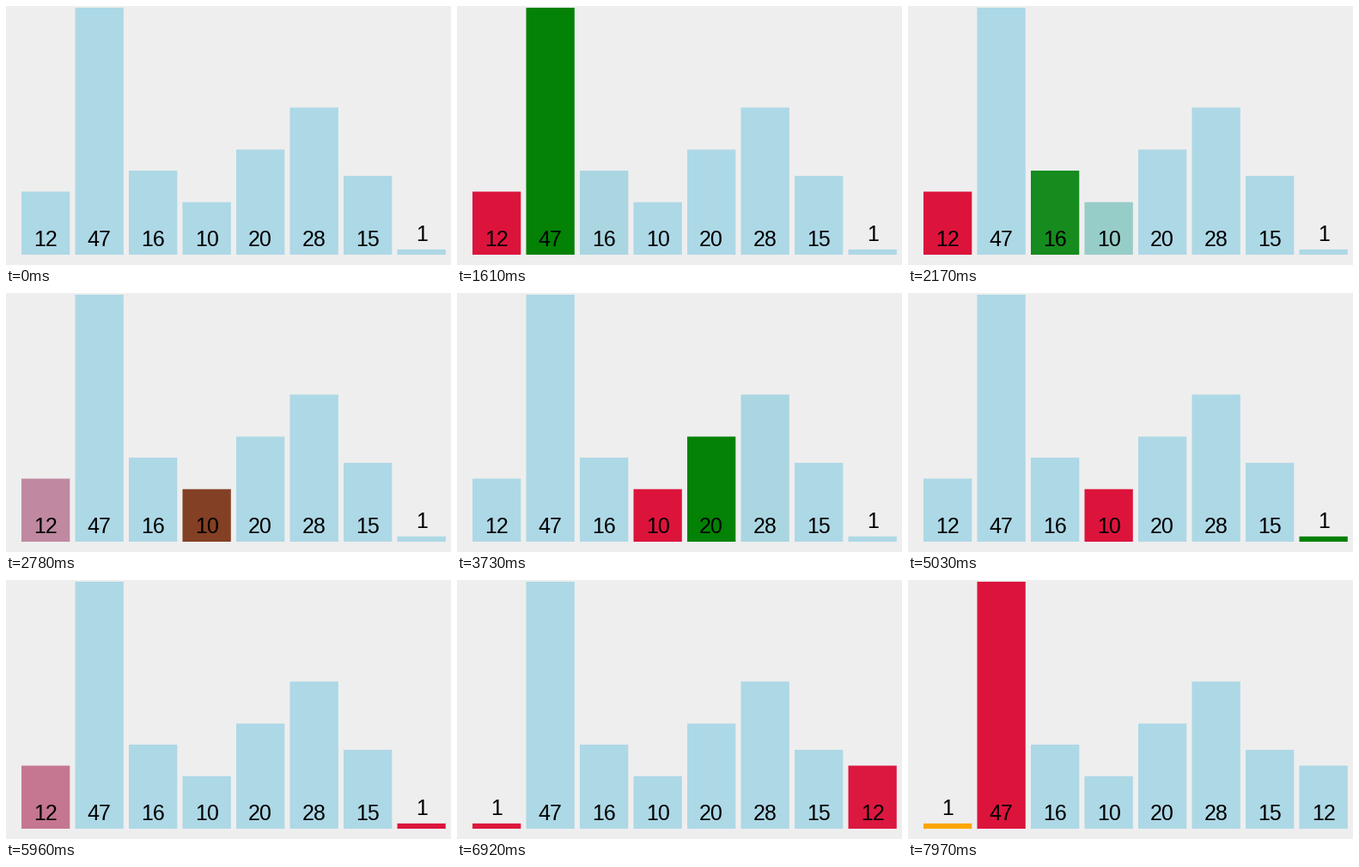
These frames come from a looping animation (518 px wide and 302 px high, 7990 ms). A matplotlib script:

```python
import numpy as np
import matplotlib.pyplot as plt
from matplotlib.animation import FuncAnimation
from matplotlib.colors import to_rgb
from matplotlib.patches import Rectangle

W, H, DPI = 518, 302, 100
LOOP, TICK, STEP = 7990, 10, 20

VALUES = [12, 47, 16, 10, 20, 28, 15, 1]
LEFT, PITCH, BAR_W, BASE = 18, 62.5, 56.3, 290
UNIT = 288 / 47
BASELINE = 280

IDLE, PICK, SCAN, DONE = (
    np.array(to_rgb(c)) for c in ("lightblue", "crimson", "green", "orange"))

# Selection sort, first pass: (start ms, end ms, {bar: new colour})
EVENTS = [
    (500, 700, {0: PICK}),
    (990, 1290, {1: SCAN}),
    (1610, 1870, {1: IDLE, 2: SCAN}),
    (2130, 2370, {2: IDLE, 3: SCAN}),
    (2660, 2890, {0: IDLE, 3: PICK}),
    (3180, 3440, {4: SCAN}),
    (3730, 3990, {4: IDLE, 5: SCAN}),
    (4260, 4500, {5: IDLE, 6: SCAN}),
    (4790, 5030, {6: IDLE, 7: SCAN}),
    (5320, 5550, {3: IDLE, 7: PICK}),
    (5840, 6100, {0: PICK}),
    (6920, 7160, {0: DONE, 7: IDLE}),
    (7440, 7700, {1: PICK}),
]
SWAP = (6360, 6660, 0, 7)

# cubic-bezier(.42, 0, .58, 1)
_s = np.linspace(0, 1, 201)
EASE_X = 1.26 * _s * (1 - _s) ** 2 + 1.74 * _s ** 2 * (1 - _s) + _s ** 3
EASE_Y = 3 * _s ** 2 * (1 - _s) + _s ** 3


def progress(t, start, end, lead=30, tail=10):
    """Eased 0..1; the slow ends of the curve lie just outside start..end."""
    if t < start:
        return 0.0
    if t >= end:
        return 1.0
    t = start + (t - start) // STEP * STEP
    x = (t - start + lead) / (end - start + lead + tail)
    return float(np.interp(x, EASE_X, EASE_Y))


def colours_at(t):
    cols = [IDLE] * len(VALUES)
    for start, end, changes in EVENTS:
        p = progress(t, start, end)
        if p > 0:
            for i, c in changes.items():
                cols[i] = cols[i] + (c - cols[i]) * p
    return cols


def values_at(t):
    """Labels swap at once, bar heights glide."""
    labels, sizes = list(VALUES), list(VALUES)
    start, end, i, j = SWAP
    if t >= start:
        labels[i], labels[j] = labels[j], labels[i]
        p = progress(t, start, end, lead=10, tail=0)
        for k in (i, j):
            sizes[k] = VALUES[k] + (labels[k] - VALUES[k]) * p
    return labels, sizes


fig = plt.figure(figsize=(W / DPI, H / DPI), dpi=DPI, facecolor="#eeeeee")
ax = fig.add_axes([0, 0, 1, 1])
ax.set_xlim(0, W)
ax.set_ylim(H, 0)
ax.axis("off")

bars, texts = [], []
for i in range(len(VALUES)):
    x = LEFT + PITCH * i
    bar = Rectangle((x, BASE), BAR_W, 0, linewidth=0, snap=False)
    bars.append(ax.add_patch(bar))
    texts.append(ax.text(x + BAR_W / 2, BASELINE, "", ha="center",
                         va="baseline", color="black",
                         family="Liberation Sans", size=25 * 72 / DPI))


def draw(n):
    t = n * TICK
    labels, sizes = values_at(t)
    for bar, text, label, size, col in zip(bars, texts, labels, sizes,
                                           colours_at(t)):
        bar.set_height(-size * UNIT)
        bar.set_facecolor(np.clip(col, 0, 1))
        text.set_text(str(label))
        # a bar too low for its label carries it on top
        text.set_y(BASELINE - (UNIT if label == 1 else 0))
    return bars + texts


anim = FuncAnimation(fig, draw, frames=LOOP // TICK, interval=TICK,
                     repeat=True, repeat_delay=0, blit=False)
plt.show()
```
